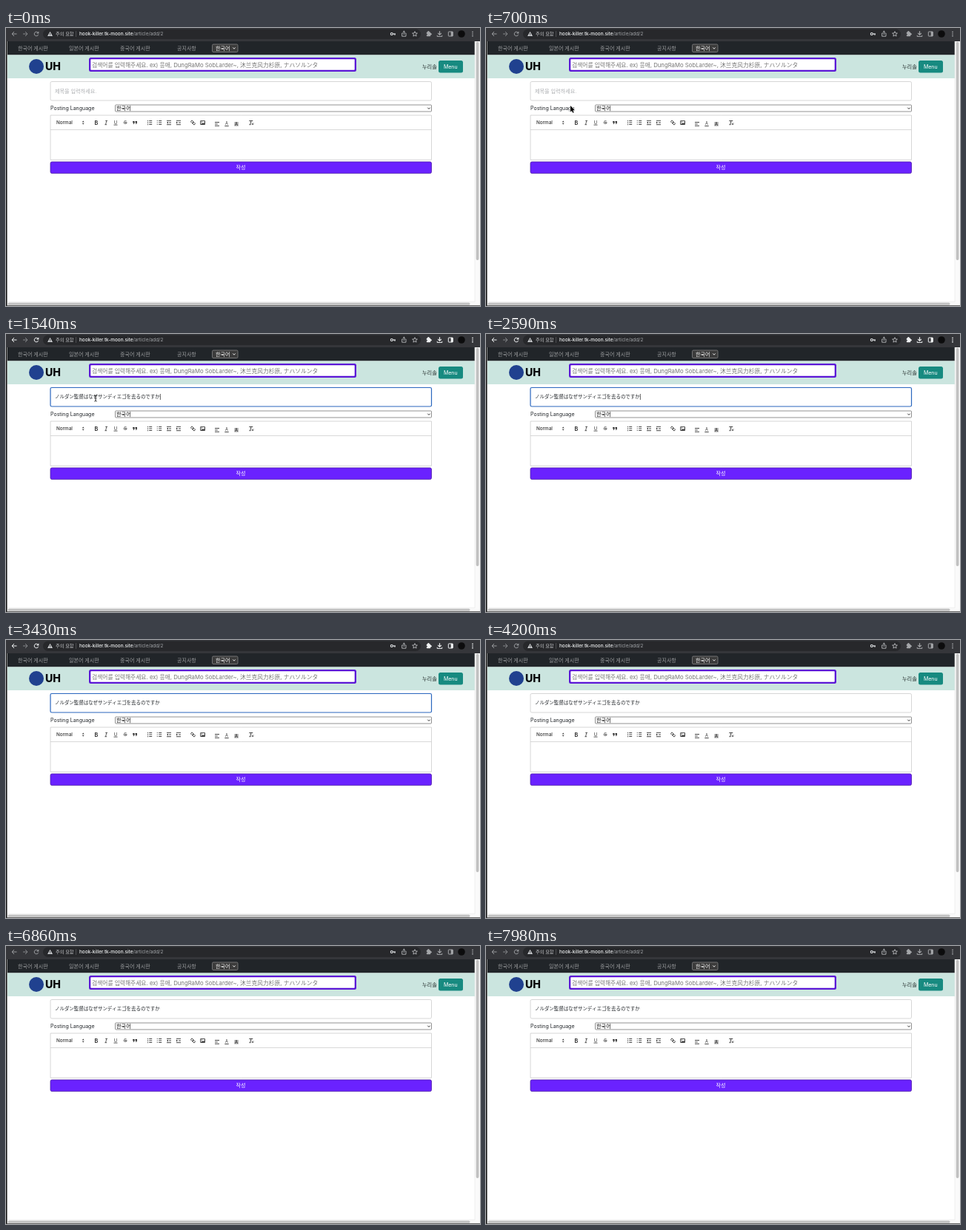
An HTML page with a canvas that plays this animation: 640x376 px, repeating every 8000 ms.

```html
<!DOCTYPE html>
<html lang="ko">
<head>
<meta charset="utf-8">
<title>Article editor</title>
<style>
html, body { margin: 0; width: 100%; height: 100%; overflow: hidden; background: #fff; }
canvas { display: block; width: 640px; height: 376px; }
</style>
</head>
<body>
<canvas id="stage"></canvas>
<script>
const W = 640, H = 376, LOOP = 8000, STEP = 70;
const SANS = 'Inter, "Noto Sans CJK KR", "Noto Sans CJK", sans-serif';
const JAPANESE = '"Noto Sans CJK JP", "Noto Sans CJK", sans-serif';
const TITLE = 'ノルダン監督はなぜサンディエゴを去るのですか';
const HINT = '검색어를 입력해주세요. ex) 응애, DungRaMo SobLarder~, 沐兰克风力杉原, ナハソルンタ';

// Timeline in ms
const ENTER = 70, ARRIVE = 840, CLICK = 1050, RELEASE = 1190;
const PASTE = 1540, LEAVE = 1610, GONE = 2240, BLUR = 3500;

const canvas = document.getElementById('stage');
const ctx = canvas.getContext('2d');
const ratio = window.devicePixelRatio || 1;
canvas.width = W * ratio;
canvas.height = H * ratio;

const clamp = v => Math.min(1, Math.max(0, v));
const mix = (a, b, k) => a + (b - a) * k;
const progress = (t, a, b) => clamp((t - a) / (b - a));
const ease = k => k * k * (3 - 2 * k);
const mixColor = (a, b, k) => `rgb(${a.map((v, i) => Math.round(mix(v, b[i], k)))})`;

function fill(x, y, w, h, color, r = 0) {
  ctx.beginPath();
  ctx.roundRect(x, y, w, h, r);
  ctx.fillStyle = color;
  ctx.fill();
}

function box(x, y, w, h, color, width = 0.8, r = 0) {
  ctx.beginPath();
  ctx.roundRect(x, y, w, h, r);
  ctx.strokeStyle = color;
  ctx.lineWidth = width;
  ctx.stroke();
}

function line(points, color, width = 1) {
  ctx.beginPath();
  for (let i = 0; i < points.length; i += 2) ctx.lineTo(points[i], points[i + 1]);
  ctx.strokeStyle = color;
  ctx.lineWidth = width;
  ctx.stroke();
}

function shape(points, color) {
  ctx.beginPath();
  for (let i = 0; i < points.length; i += 2) ctx.lineTo(points[i], points[i + 1]);
  ctx.closePath();
  ctx.fillStyle = color;
  ctx.fill();
}

function circle(x, y, r, color, width = 0) {
  ctx.beginPath();
  ctx.arc(x, y, r, 0, Math.PI * 2);
  if (width) {
    ctx.strokeStyle = color;
    ctx.lineWidth = width;
    ctx.stroke();
  } else {
    ctx.fillStyle = color;
    ctx.fill();
  }
}

// y is the vertical centre of the line; returns the advance width
function text(str, x, y, size, color, { weight = 400, align = 'left', family = SANS } = {}) {
  ctx.font = `${weight} ${size}px ${family}`;
  ctx.textAlign = align;
  ctx.fillStyle = color;
  ctx.fillText(str, x, y + size * 0.36);
  return ctx.measureText(str).width;
}

const chevron = (x, y, color) => line([x - 1.7, y - 0.9, x, y + 0.9, x + 1.7, y - 0.9], color, 0.9);

function drawBrowserBar(active) {
  const nav = active ? '#f1f3f4' : '#9a9c9f';
  const tool = active ? '#f1f3f4' : '#a5a7aa';
  const soft = '#c8cacd';
  fill(0, 0, W, 18, '#35363a');
  fill(50, 1.5, 510, 13.5, '#27282b', 6.7);

  line([14.5, 8, 8, 8], nav);
  line([11, 5, 8, 8, 11, 11], nav);
  line([23, 8, 29, 8], '#85878a');
  line([26, 5, 29, 8, 26, 11], '#85878a');
  ctx.beginPath();
  ctx.arc(41, 8, 2.8, 0.3, 5.5);
  ctx.strokeStyle = nav;
  ctx.lineWidth = 1;
  ctx.stroke();
  shape([44.3, 4.4, 44.3, 7.6, 41.1, 7.6], nav);

  shape([59.5, 4.8, 63, 11, 56, 11], soft);
  fill(59.1, 7, 0.8, 2, '#27282b');
  fill(59.1, 9.5, 0.8, 0.8, '#27282b');
  text('주의 요함', 67, 8, 6.2, soft);
  fill(94, 4, 0.6, 8, '#65676a');
  const host = text('hook-killer.tk-moon.site', 99, 8, 6.4, '#f1f3f4', { weight: 500 });
  text('/article/add/2', 99 + host, 8, 6.4, '#a3a6aa');

  circle(520.8, 8, 1.5, '#e8eaed', 1.1);
  line([522.3, 8, 526, 8], '#e8eaed', 1.2);
  line([525, 8, 525, 9.8], '#e8eaed', 1);
  line([536, 7, 534.7, 7, 534.7, 11.2, 540, 11.2, 540, 7, 538.7, 7], soft, 0.8);
  line([537.35, 9, 537.35, 4.2], soft, 0.8);
  line([535.8, 5.6, 537.35, 4.1, 538.9, 5.6], soft, 0.8);
  ctx.beginPath();
  for (let i = 0; i < 10; i++) {
    const a = -Math.PI / 2 + i * Math.PI / 5, r = i % 2 ? 1.6 : 3.6;
    ctx.lineTo(552 + r * Math.cos(a), 8.2 + r * Math.sin(a));
  }
  ctx.closePath();
  ctx.strokeStyle = soft;
  ctx.lineWidth = 0.8;
  ctx.stroke();

  fill(567.8, 5.6, 5.4, 5.6, tool, 0.8);
  circle(570.4, 5.2, 1.2, tool);
  circle(573.5, 8.3, 1.2, tool);
  circle(568, 8.6, 0.9, '#35363a');
  line([585.5, 4.2, 585.5, 9], tool, 1.2);
  line([583.2, 7, 585.5, 9.3, 587.8, 7], tool, 1.1);
  line([582.2, 9.8, 582.2, 11.4, 588.8, 11.4, 588.8, 9.8], tool, 1);
  box(597.3, 5, 6, 6, tool, 1, 0.6);
  fill(600.7, 5, 2.6, 6, tool);
  circle(615, 8, 4.8, '#0c0c0d');
  for (const y of [5.3, 8, 10.7]) circle(630, y, 0.85, tool);
}

function drawHeader() {
  fill(2, 18, 631, 18.5, '#212529');
  const links = [['한국어 게시판', 16], ['일본어 게시판', 85], ['중국어 게시판', 154], ['공지사항', 231]];
  for (const [label, x] of links) text(label, x, 27, 7, '#9b9d9f');
  fill(278.5, 22, 34.5, 10.5, '#3b3b3b', 1.5);
  box(278.5, 22, 34.5, 10.5, '#858585', 0.8, 1.5);
  text('한국어', 283, 27.2, 7, '#fff');
  chevron(308, 27.3, '#fff');

  fill(2, 36.5, 631, 31.5, '#cbe5df');
  circle(41, 52, 10, '#20418f');
  text('UH', 53, 52, 14.2, '#0b0b0d', { weight: 800 });
  fill(112, 40, 361, 19, '#5b17d6', 2.5);
  fill(114.3, 42.2, 356.4, 14.6, '#fff', 0.8);
  text(HINT, 116, 49.8, 7.75, '#757575');
  text('누리솔', 562, 52, 7.2, '#26302f');
  fill(584, 44, 33, 16.5, '#178a80', 2.5);
  text('Menu', 600.3, 52.2, 7, '#fff', { align: 'center' });
}

function drawTitle(t) {
  const gray = [204, 204, 204], dark = [70, 74, 80], blue = [42, 103, 190];
  let border = mixColor(gray, dark, progress(t, 980, 1120));
  if (t > 1120) border = mixColor(dark, blue, progress(t, 1120, 1260));
  if (t >= BLUR) border = mixColor(blue, gray, progress(t, BLUR, BLUR + 140));
  const focused = t >= CLICK && t < BLUR;
  box(60, 72.5, 514.5, 25.5, border, focused ? 1.2 : 0.8, 1.8);

  const pasted = t >= PASTE;
  const width = pasted
    ? text(TITLE, 66, 85, 6.45, '#212529', { family: JAPANESE })
    : text('제목을 입력하세요.', 66, 85, 7.1, '#adafb2') && 0;
  const since = t - (pasted ? PASTE : CLICK);
  if (focused && since % 1000 < 500) fill(66.3 + width, 81, 0.7, 8, '#222');
}

function drawList(x, ordered) {
  for (const dy of [-2.5, 0, 2.5]) {
    line([x - 0.8, 128 + dy, x + 3.2, 128 + dy], '#333', 0.9);
    if (ordered) fill(x - 3, 127.2 + dy, 0.8, 1.6, '#333');
    else circle(x - 2.7, 128 + dy, 0.6, '#333');
  }
}

function drawIndent(x, dir) {
  line([x - 3, 125.3, x + 3, 125.3], '#333', 0.9);
  line([x, 128, x + 3, 128], '#333', 0.9);
  line([x - 3, 130.7, x + 3, 130.7], '#333', 0.9);
  shape([x - 2 - dir, 126.6, x - 2 - dir, 129.4, x - 2 + dir, 128], '#333');
}

function drawToolbar() {
  const ink = '#333';
  const mid = { align: 'center' };
  text('Normal', 68, 128, 6.3, ink, { weight: 500 });
  shape([102.8, 127.3, 105.6, 127.3, 104.2, 125.4], ink);
  shape([102.8, 128.7, 105.6, 128.7, 104.2, 130.6], ink);

  text('B', 122, 128, 7.2, ink, { ...mid, weight: 700 });
  line([134.2, 125.4, 137, 125.4], ink, 0.8);
  line([135.9, 125.4, 134.5, 130.7], ink, 0.8);
  line([133.4, 130.7, 136.2, 130.7], ink, 0.8);
  text('U', 148, 127.4, 6.2, ink, mid);
  line([145.5, 131.1, 150.5, 131.1], ink, 0.8);
  text('S', 161, 128, 6.6, ink, mid);
  line([158.3, 128, 163.7, 128], ink, 0.7);
  for (const x of [171.2, 174.6]) {
    fill(x, 126, 2.4, 2.3, ink, 0.3);
    shape([x + 1.3, 128, x + 2.4, 128, x + 1.4, 130, x + 0.4, 130], ink);
  }

  drawList(194, true);
  drawList(207, false);
  drawIndent(220, -1);
  drawIndent(233, 1);

  ctx.save();
  ctx.translate(252.5, 128);
  ctx.rotate(Math.PI / 4);
  box(-3.4, -1.3, 3.7, 2.6, ink, 0.9, 1.3);
  box(-0.3, -1.3, 3.7, 2.6, ink, 0.9, 1.3);
  ctx.restore();
  box(262.7, 125.6, 5.8, 4.9, ink, 0.9);
  circle(264.3, 127.2, 0.6, ink);
  shape([263.2, 130, 265, 128.4, 266.2, 129, 267.2, 127.6, 268, 130], ink);

  [6, 3.8, 6].forEach((w, i) => line([282, 127.5 + i * 2.4, 282 + w, 127.5 + i * 2.4], ink, 0.9));
  text('A', 298, 129, 5.6, ink, mid);
  line([295.3, 132.5, 300.7, 132.5], ink, 0.9);
  fill(308.3, 127, 5.6, 5.8, '#b5b5b5');
  text('A', 311.1, 130, 5.6, ink, { ...mid, weight: 500 });
  line([328.3, 125.5, 333.3, 125.5], ink, 0.9);
  line([331, 125.5, 329.7, 130.7], ink, 0.9);
  line([328.3, 130.7, 330.6, 130.7], ink, 0.8);
  line([331.8, 128.5, 334.3, 131], ink, 0.8);
  line([334.3, 128.5, 331.8, 131], ink, 0.8);
}

function drawForm(t) {
  drawTitle(t);
  text('Posting Language', 60, 108.3, 7, '#212529');
  box(147.5, 104, 427, 9, '#767676', 0.8, 1);
  text('한국어', 149, 108.4, 7.2, '#111');
  chevron(571, 108.6, '#222');

  box(60, 118, 514.5, 60.3, '#ccc', 0.8);
  line([60, 137.6, 574.5, 137.6], '#ccc', 0.8);
  drawToolbar();

  fill(60, 181, 514.5, 15.6, '#6a22ff', 2);
  box(60, 181, 514.5, 15.6, '#4b1aa8', 0.8, 2);
  text('작성', 317, 188.7, 7, '#fff', { align: 'center' });
}

function drawFrame() {
  fill(633, 18, 7, 353, '#fafafa');
  fill(2, 370.3, 638, 5, '#fafafa');
  line([633, 18, 633, 370.3, 2, 370.3], '#e6e6e6', 0.6);
  fill(634.7, 18.5, 3.8, 295.5, '#c1c1c1', 1.9);
  fill(2.5, 371.5, 624, 3.3, '#c1c1c1', 1.6);
  fill(0, 18, 1.5, H, '#111');
  fill(0, 375.2, W, 0.8, '#333');
}

function mouseAt(t) {
  if (t < ENTER || t >= GONE) return null;
  if (t < LEAVE) {
    const k = ease(progress(t, ENTER, ARRIVE)), d = ease(progress(t, RELEASE, 1400));
    return [mix(-2, 125, k) - 4 * d, mix(284, 88, k) - d];
  }
  const k = ease(progress(t, LEAVE, GONE));
  return [mix(121, -6, k), mix(87, 328, k)];
}

function drawMouse(t) {
  const pos = mouseAt(t);
  if (!pos) return;
  const [x, y] = pos;
  if (t >= CLICK && t < RELEASE) circle(x, y, 7, '#111', 1.5);
  if (x > 60 && y > 72 && y < 98) {
    line([x, y - 3.5, x, y + 3.5], '#111', 0.9);
    line([x - 1.7, y - 4.2, x, y - 3.4, x + 1.7, y - 4.2], '#111', 0.8);
    line([x - 1.7, y + 4.2, x, y + 3.4, x + 1.7, y + 4.2], '#111', 0.8);
    return;
  }
  ctx.save();
  ctx.translate(x, y);
  const arrow = [0, 0, 0, 8.5, 2, 6.8, 3.3, 9.7, 4.7, 9.1, 3.4, 6.2, 6, 6.1];
  line([...arrow, 0, 0], '#fff', 1.6);
  shape(arrow, '#000');
  ctx.restore();
}

function draw(t) {
  ctx.setTransform(ratio, 0, 0, ratio, 0, 0);
  fill(0, 0, W, H, '#fff');
  drawBrowserBar(t >= CLICK && t < BLUR);
  drawHeader();
  drawForm(t);
  drawFrame();
  drawMouse(t);
}

const start = performance.now();
function tick() {
  const t = (performance.now() - start) % LOOP;
  draw(Math.floor(t / STEP) * STEP);
  requestAnimationFrame(tick);
}
tick();
</script>
</body>
</html>
```
